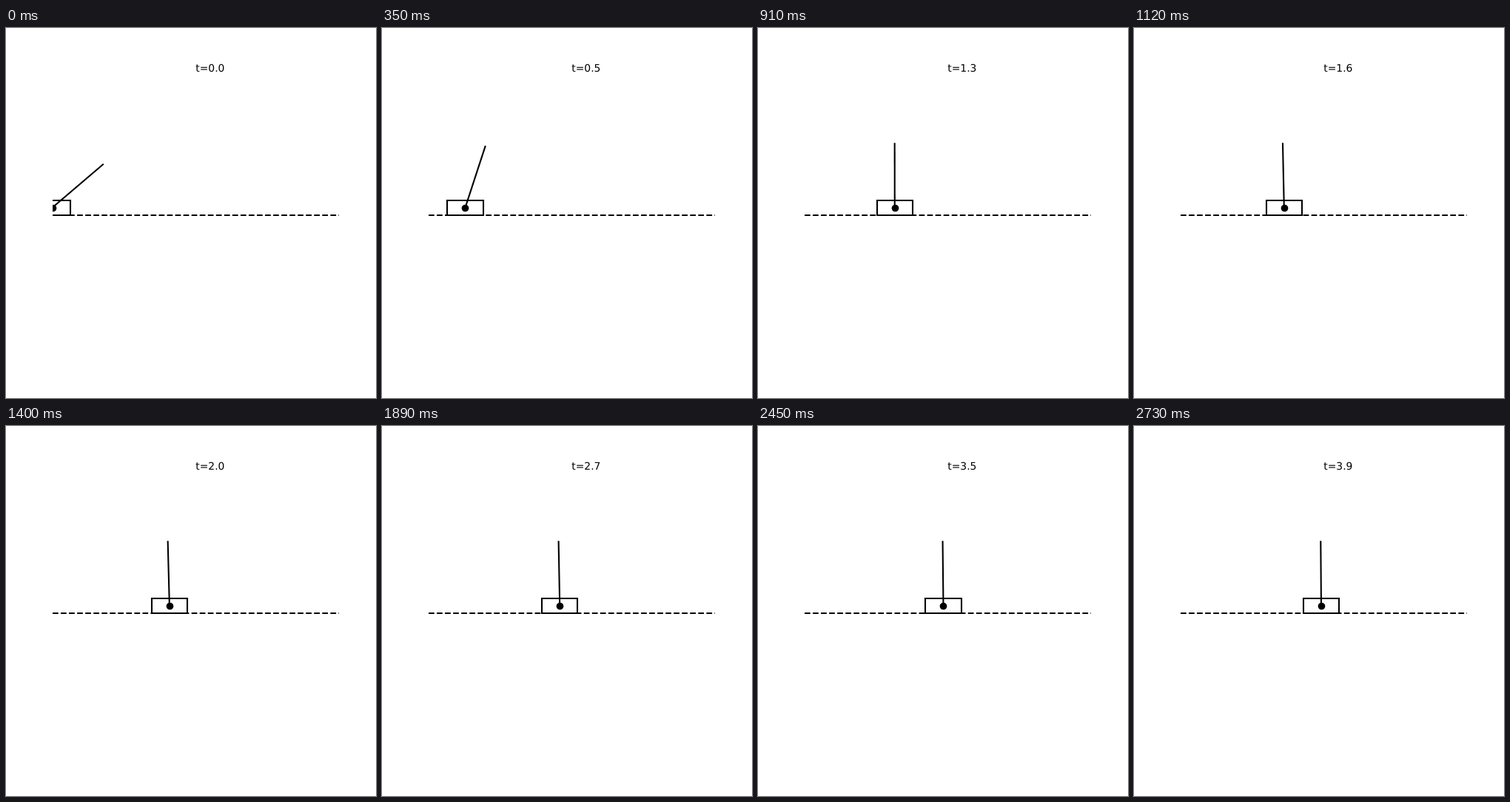
Recreate the animation shown at these times as an HTML page. Size 500 px wide and 500 px high, loop 2.8 s.

```html
<!DOCTYPE html>
<html lang="en">
<head>
<meta charset="utf-8">
<title>Cart and pole</title>
<style>
  html, body { margin: 0; width: 100%; height: 100%; overflow: hidden; background: #fff; }
  svg { display: block; width: 500px; height: 500px; }
  .line { fill: none; stroke: #000; stroke-width: 2.083; }
  #pole { stroke-linecap: square; }
  text { font: 13.889px "DejaVu Sans", sans-serif; text-rendering: geometricPrecision; }
</style>
</head>
<body>
<svg viewBox="0 0 500 500">
  <clipPath id="axes"><rect x="63" y="60" width="387" height="385"/></clipPath>
  <g clip-path="url(#axes)">
    <path class="line" d="M63 253H450" stroke-dasharray="7.708 3.333"/>
    <path class="line" id="cart"/>
    <path class="line" id="pole"/>
    <circle id="pivot" cy="243.5" r="4.86"/>
  </g>
  <text id="label" x="256.25" y="59">t=0.0</text>
</svg>
<script>
  const STEP = 70, STEPS = 40;
  const { sin, cos, exp, round, PI } = Math;

  // world units to pixels
  const px = x => 256.25 + 48.4375 * x;
  const py = y => 252.5 - 48.125 * y;

  const $ = id => document.getElementById(id);
  const cart = $('cart'), pole = $('pole'), pivot = $('pivot'), label = $('label');

  // damped approach to the centre, with a short start-up term
  const position = t =>
    -6.4 * exp(-1.085 * t) * cos(0.42 * (t - 2.1)) + (0.068 - 2.45 * t) * exp(-6 * t);

  // fast recovery plus a slow backward lean
  const LEAN = 0.136;
  const tilt = t =>
    (PI / 4 + LEAN) * (1 + 2.25 * t) * exp(-3.3 * t) - LEAN * exp(-0.76 * t);

  function draw(n) {
    const t = n / 10, x = position(t), angle = tilt(t);
    const left = round(px(x - 0.5)), right = round(px(x + 0.5));
    cart.setAttribute('d', `M${left} 253H${right}V233H${left}Z`);
    pole.setAttribute('d', `M${px(x)} ${py(0.2)}L${px(x + 2 * sin(angle))} ${py(2 * cos(angle))}`);
    pivot.setAttribute('cx', round(px(x)) + 0.5);
    label.textContent = 't=' + t.toFixed(1);
  }

  let shown = -1;
  function tick() {
    const n = Math.floor(performance.now() / STEP) % STEPS;
    if (n !== shown) draw(shown = n);
    requestAnimationFrame(tick);
  }
  tick();
</script>
</body>
</html>
```
